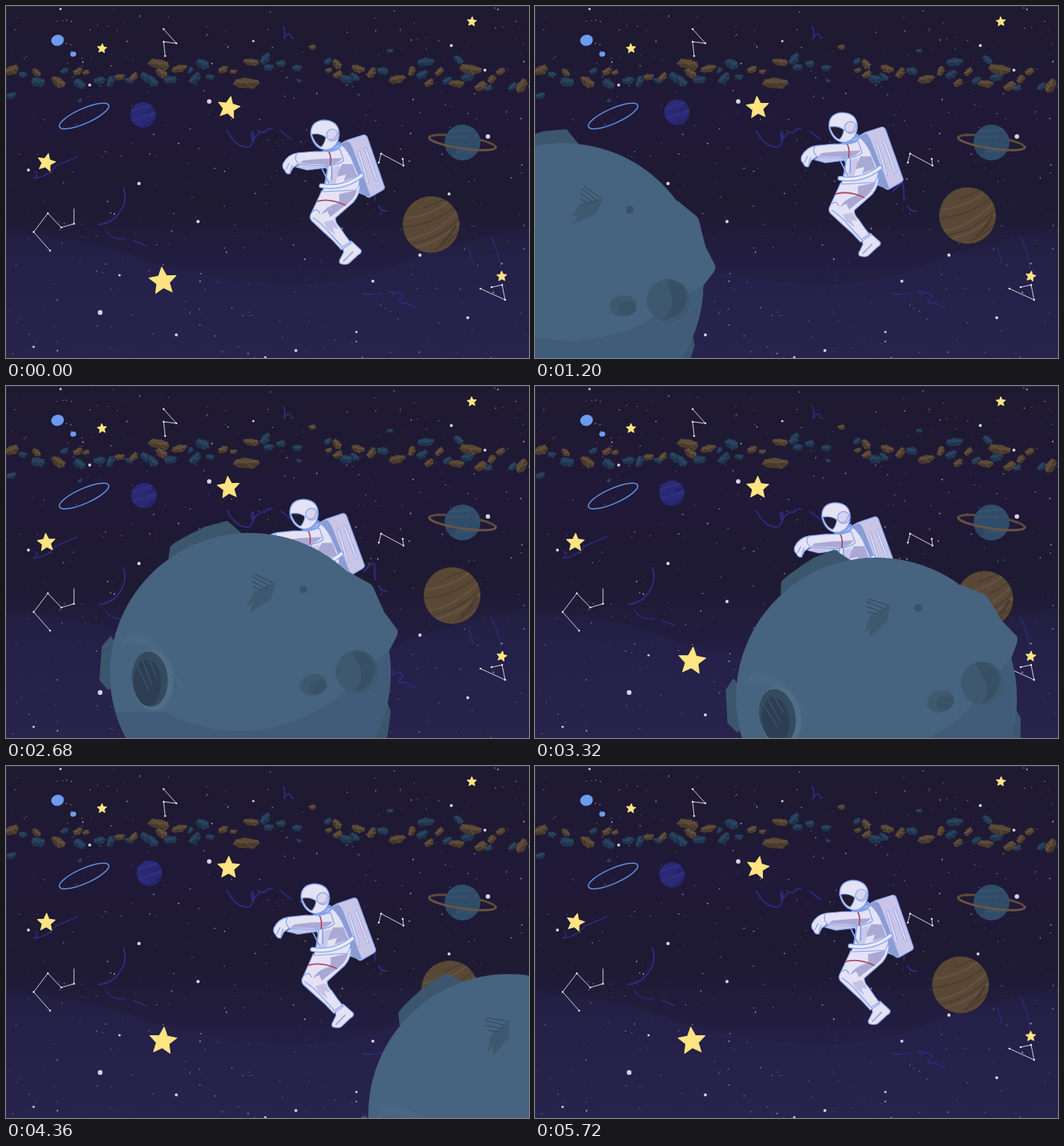
Animation of 700x472 px, one loop 5760 ms. Source, as an HTML page with a canvas:

```html
<!DOCTYPE html>
<html>
<head>
<meta charset="utf-8">
<title>Spacewalk</title>
<style>
html, body { margin: 0; width: 100%; height: 100%; overflow: hidden; background: #1f1b33; }
canvas { display: block; }
</style>
</head>
<body>
<canvas id="stage" width="700" height="472"></canvas>
<script>
const W = 700, H = 472, LOOP = 5760, STEP = 40;
const stage = document.getElementById('stage');
const sky = document.createElement('canvas');
sky.width = W;
sky.height = H;
let g = sky.getContext('2d');

let seed = 11;
const rnd = () => (seed = seed * 16807 % 2147483647) / 2147483647;

// Drawing helpers
function fill(d, color) {
  g.fillStyle = color;
  g.fill(new Path2D(d));
}
function line(d, color, width = 1) {
  g.strokeStyle = color;
  g.lineWidth = width;
  g.stroke(new Path2D(d));
}
function shape(d, color, edge, width) {
  fill(d, color);
  line(d, edge, width);
}
function oval(x, y, rx, ry, color, turn = 0) {
  g.fillStyle = color;
  g.beginPath();
  g.ellipse(x, y, rx, ry, turn, 0, 7);
  g.fill();
}
const disc = (x, y, r, color) => oval(x, y, r, r, color);
function placed(x, y, degrees, draw) {
  g.save();
  g.translate(x, y);
  g.rotate(degrees * Math.PI / 180);
  draw();
  g.restore();
}
function clipDisc(r, draw) {
  g.save();
  g.beginPath();
  g.arc(0, 0, r, 0, 7);
  g.clip();
  draw();
  g.restore();
}

// Smooth track through keys of [time, ...values]
function track(keys, t) {
  let i = 1;
  while (t >= keys[i + 1][0]) i++;
  const [a, b, c, d] = keys.slice(i - 1, i + 3);
  const span = c[0] - b[0], u = (t - b[0]) / span, v = 1 - u;
  return b.slice(1).map((p, j) => {
    const n = j + 1;
    const m0 = (c[n] - a[n]) / (c[0] - a[0]) * span;
    const m1 = (d[n] - b[n]) / (d[0] - b[0]) * span;
    return v * v * (1 + 2 * u) * p + u * v * v * m0 + u * u * (3 - 2 * u) * c[n] - u * u * v * m1;
  });
}
function cyclic(keys) {
  const shift = (k, by) => [k[0] + by, ...k.slice(1)];
  return [shift(keys[keys.length - 1], -LOOP), ...keys, shift(keys[0], LOOP), shift(keys[1], LOOP)];
}

const floatPath = cyclic([[0, 0, 0, 0], [600, -7, -8, -1], [1840, -22, -9.5, 0],
  [2680, -28, -1, -1], [3320, -24, 3.5, -1], [4360, -13, 5, -1]]);
const brownPath = cyclic([[0, 569, 293], [600, 572, 285.5], [1840, 587, 278],
  [2680, 597, 281], [3320, 602, 286], [4360, 594, 299]]);
const moonPath = [[-600, -323, 410, -16], [0, -203, 402, -12], [600, -83, 389, -8],
  [1840, 165, 360, 0], [2680, 327, 385, -12.8], [3320, 457, 418, -20],
  [4360, 673, 467, -28], [5760, 960, 535, -36], [6400, 1090, 565, -40]];

// x, y, width
const brownRocks = [8,86,20, 41,89,13, 70,102,20, 96,88,14, 107,89,10, 152,95,14, 171,95,14,
  205,78,30, 232,84,22, 208,90,18, 291,85,14, 304,88,10, 322,103,34, 328,75,22, 410,55,10,
  432,86,10, 443,78,16, 444,92,14, 471,84,18, 489,90,16, 523,98,24, 543,87,14, 566,103,14,
  580,88,14, 603,104,22, 622,85,30, 636,107,18, 662,88,14, 650,98,14, 690,107,20];
const blueRocks = [22,92,12, 43,102,20, 7,120,14, 78,87,12, 98,104,18, 99,127,7, 125,100,16,
  140,101,16, 165,100,12, 187,96,18, 196,101,18, 220,99,18, 247,86,10, 253,97,18, 263,78,20,
  273,95,12, 347,71,18, 352,82,14, 368,77,14, 390,83,14, 392,100,7, 431,74,12, 456,98,18,
  467,95,14, 504,87,16, 514,60,9, 557,92,16, 561,75,24, 591,100,14, 605,72,15, 618,95,18,
  646,110,12, 678,108,14];
const brightDots = [272,128,3, 645,175,3, 126,411,3.2, 178,238,2.3, 257,289,2.2, 228,441,2.1,
  554,334,2.2, 593,252,2, 491,369,2.1, 112,106,2, 596,53,2, 30,220,2, 641,86,2, 618,418,2,
  388,462,2, 73,4,1.6, 331,47,1.6, 152,361,1.6, 37,457,1.6, 469,437,1.6, 347,471,1.6];
function triples(list, draw) {
  for (let i = 0; i < list.length; i += 3) draw(list[i], list[i + 1], list[i + 2]);
}

function rocks(list, base, light, dark) {
  triples(list, (x, y, w) => {
    const tilt = w > 20 ? rnd() * 24 - 12 : rnd() * 110 - 65;
    placed(x, y, tilt, () => {
      const pts = [];
      for (let i = 0; i < 7; i++) {
        const a = (i + rnd() * .5) * Math.PI * 2 / 7, r = w * (.48 + rnd() * .1);
        pts.push([Math.cos(a) * r, Math.sin(a) * r * (w > 20 ? .45 : .64)]);
      }
      shape('M' + pts.join('L') + 'Z', base, '#211d30', .6);
      fill('M' + [...pts.slice(0, 4), [0, 0]].join('L') + 'Z', dark);
      line(`M${pts[4]}L0 0L${pts[6]}M0 0L${pts[1]}`, light, .7);
    });
  });
}

function paintSky() {
  const shade = g.createLinearGradient(0, 0, 0, H);
  shade.addColorStop(0, '#1e1a2f');
  shade.addColorStop(.3, '#201938');
  shade.addColorStop(.55, '#1e1a32');
  shade.addColorStop(.75, '#231e42');
  shade.addColorStop(1, '#27234b');
  g.fillStyle = shade;
  g.fillRect(0, 0, W, H);
  fill('M0 305Q90 305 170 335T350 372T520 348T700 298V472H0Z', 'rgba(42,38,86,.32)');
  line('M.5 472V.5H700', '#2c2752');
  for (let i = 0; i < 390; i++) {
    g.globalAlpha = .3 + rnd() * .55;
    disc(rnd() * W, rnd() * H, .45 + rnd() * rnd() * .8, '#dcd9ee');
  }
  g.globalAlpha = 1;
  triples(brightDots, (x, y, r) => disc(x, y, r, '#d5d1e6'));

  g.lineCap = g.lineJoin = 'round';
  const ink = '#2e2b7c';
  line('M371 27Q375 34 372 44Q378 34 381 39Q381 44 385 43M368 168L382 179', ink, 1.8);
  line('M296 167Q308 191 326 189Q334 181 331 169Q327 167 330 180Q342 165 346 170Q349 164 356 165', ink, 2);
  line('M38 222Q46 224 37 231Q56 229 66 215L96 202M170 314L187 321M133 300Q140 314 160 312', ink, 1.5);
  line('M157 244Q165 265 145 285Q135 292 125 293', ink, 2.2);
  line('M479 386Q490 388 502 385M512 384Q525 381 517 388Q530 379 531 391Q519 398 535 398L548 404', ink, 1.8);
  line('M649 309Q660 330 662 352M619 324L625 345', ink, 1.3);
  line('M479 249Q492 234 493 239L494 260M499 268Q502 276 510 275', ink, 2.2);

  const stars = 'M211 31L228 50L211 48L213 67M59 328L37 303L56 278L74 297L91 292V272' +
    'M499 210L502 198L532 214L531 205M635 379L668 394L664 374L650 377';
  line(stars, '#d8d5e8', 1);
  for (const p of stars.match(/[ML]\d+ \d+/g)) {
    const [x, y] = p.slice(1).split(' ');
    disc(+x, +y, 1.3, '#eeecf6');
  }

  rocks(blueRocks, '#263f5b', '#34516f', '#1f334c');
  rocks(brownRocks, '#594836', '#715d47', '#49392d');

  oval(69, 46, 8.5, 7.5, '#6b9cf0', -.2);
  oval(90, 64.5, 4, 3.4, '#6b9cf0', -.2);
  placed(104.5, 147.5, -24, () => {
    g.strokeStyle = '#6293e6';
    g.lineWidth = 1.6;
    g.beginPath();
    g.ellipse(0, 0, 36, 10, 0, 0, 7);
    g.stroke();
  });

  placed(611, 183, 8.5, () => {
    const ring = 'A45 8 0 0 ';
    line(`M-45 0${ring}1 45 0`, '#604b3b', 3);
    disc(0, 0, 24, '#2f4d69');
    clipDisc(24, () => {
      line('M-18 -12L14 -20M-22 -4L20 -11M-16 15L18 9', '#35536f', 3);
      disc(11, -10, 4, '#3c4765');
      disc(-13, 13, 6, '#2b4761');
    });
    line(`M-45 0${ring}0 45 0`, '#6b5443', 3);
  });
}

function star(x, y, r, tilt) {
  placed(x, y, tilt, () => {
    const pts = [];
    for (let i = 0; i < 10; i++) {
      const a = i * Math.PI / 5 - Math.PI / 2, q = i % 2 ? r * .47 : r;
      pts.push([Math.cos(a) * q, Math.sin(a) * q]);
    }
    shape('M' + pts.join('L') + 'Z', '#ffe482', '#ffe482', 1);
  });
}

function brownPlanet() {
  disc(0, 0, 38, '#594836');
  clipDisc(38, () => {
    line('M-34 -8Q0 -12 25 -32M-30 20Q6 14 36 -18M-20 31Q14 22 38 -2', '#645240', 2.5);
    line('M-38 4Q4 0 34 -25M-8 -23L16 -33M-27 26Q10 20 38 -9M4 34Q25 25 38 8', '#4b3b30', 1.6);
    line('M20 20L33 2M12 27L27 14', '#4b3b30', 3);
  });
}

function purplePlanet() {
  disc(0, 0, 17, '#292976');
  clipDisc(17, () => {
    line('M-16 -5L10 -13M-15 8L16 -2', '#30307f', 3);
    line('M2 15L16 6M5 -3L16 -8', '#242464', 3);
  });
}

function moon() {
  const dark = '#3b566d', mid = '#3e596f';
  fill('M-73 -174L-67 -189Q-63 -194 -15 -205L15 -206L33 -182L0 -150Z', dark);
  fill('M-171 -90L-186 -79L-199 -36L-191 -20L-150 -30Z', dark);
  fill('M170 76L172 92L160 124L134 142L120 120Z', dark);
  fill('M158 -104Q166 -96 180 -84Q186 -80 187 -70L193 -40L205 -13Q205 -7 198 0L186 14L150 0Z', '#466380');
  disc(0, 0, 188, '#466380');
  clipDisc(188, () => {
    fill('M-190 10L-122 26Q-72 72 10 78Q90 74 122 48L190 10V190H-190Z', 'rgba(60,86,116,.5)');
    fill('M-160 -78Q-118 -72 -108 -34L-92 2L-102 -42Q-116 -82 -145 -88Z', 'rgba(82,111,139,.35)');
  });
  oval(-130, -20, 28, 41, '#506d87', .15);
  oval(-133, -22, 24, 37, '#344a5e', .15);
  oval(-137, -18, 18, 31, '#2d4053', .2);
  line('M-146 -48L-138 -8M-137 -48L-132 -15M-128 -48L-124 -25', '#3b5268', 1.6);
  disc(140, 30, 29, mid);
  fill('M140 2Q164 4 165 30Q157 54 130 56Q150 40 143 20Z', '#385065');
  oval(79, 34, 18.5, 14.5, mid);
  oval(84, 38, 12, 9, '#395268');
  disc(94, -94, 5.2, '#385268');
  fill('M28 -105L60 -112L49 -91L18 -79L24 -91L15 -88Z', mid);
  line('M31 -126L50 -109M35 -128L56 -112M30 -119L47 -105M29 -112L39 -105', '#354c60', 1.3);
}

function astronaut() {
  const suit = '#e5e2f5', blue = '#83a3ee', tone = '#aaa9d5', red = '#a94b63';
  // Backpack
  shape('M447 185L456 180L478 173Q482 172 484 177L506 241Q508 244 504 247L488 256Q485 258 481 254L464 247Z', '#c9c5e8', blue, 1.2);
  fill('M448 185L457 181Q461 183 464 191L488 255Q483 257 474 250Z', '#8b9bd3');
  line('M472 195Q478 215 484 237M481 191Q488 210 496 233', '#9babe1', 4);
  line('M472 195Q478 215 484 237M481 191Q488 210 496 233', '#e0def5', 2);
  // Boots and legs
  shape('M450 320L462 315L475 327Q477 331 471 334L459 345Q454 348 447 345Q445 342 448 338L452 330Z', suit, blue, 1.2);
  line('M452 342L464 330', tone, 2);
  shape('M423 247L474 240Q474 252 465 263L441 284Q440 290 447 297Q454 308 462 318L449 327Q438 314 425 303L409 288Q405 283 409 277Z', suit, blue, 1.2);
  fill('M446 252L470 247Q466 261 448 272L434 283L430 275L422 280Q428 268 446 264Z', tone);
  fill('M425 290L438 287L445 299L437 297L441 307L430 299Z', '#c4c1e4');
  line('M416 262Q433 257 454 267', red, 1.8);
  line('M411 284Q424 293 431 302L449 322M411 275Q417 270 420 278M449 324L461 316', blue, 1.2);
  // Torso
  shape('M421 196L448 185Q460 196 465 211L473 230Q474 241 468 247L424 249L430 222Z', suit, blue, 1);
  fill('M450 212L464 212L470 228L452 235L455 226L440 230Z', tone);
  fill('M438 216L447 214L441 239L431 242Z', '#cbc8e8');
  line('M431 214L427 240M436 214L436 233M423 218L432 237', blue, 1.8);
  line('M422 241Q452 246 476 227', blue, 6.5);
  line('M422 241Q452 246 476 227', '#eae9fa', 4);
  // Arms
  shape('M400 207L427 208L428 217L403 220L388 216Z', '#c8c5e8', blue, 1);
  shape('M447 192Q430 196 414 195L390 197Q377 199 371 211Q369 217 373 220Q375 226 380 225L384 217L391 212L420 214Q444 215 452 207Z', suit, blue, 1.2);
  fill('M398 207L420 205L450 204Q444 213 430 213L393 211Z', tone);
  line('M389 198Q385 205 391 211M375 219L379 211M380 223L383 213', blue, 1.2);
  line('M432 195Q436 202 434 213', red, 1.8);
  // Helmet
  line('M423 191Q436 196 446 183M427 194Q440 196 448 187', blue, 3);
  shape('M408 173Q407 154 426 153Q446 154 446 173Q444 191 428 193Q413 192 408 173Z', suit, blue, 1.3);
  shape('M409 172Q420 170 428 176Q427 184 422 189Q414 187 409 172Z', '#201c32', blue, 1.2);
  g.beginPath();
  g.arc(437, 173, 8, 0, 7);
  g.fillStyle = '#d8d4ee';
  g.strokeStyle = blue;
  g.fill();
  g.stroke();
  line('M433 179Q441 181 443 171', tone, 1.5);
}

const view = stage.getContext('2d');
view.lineCap = view.lineJoin = 'round';

function frame(now) {
  const t = Math.floor(now % LOOP / STEP) * STEP;
  const wave = (period, delay) => Math.cos((t - delay) / period * Math.PI * 2);
  g.drawImage(sky, 0, 0);

  const rock = wave(1920, 0);
  star(128.5, 57, 6.5, 6 * rock);
  star(54, 210, 12.5, 3 + 10 * rock);
  star(298, 136.5, 15.5, 2 + 9 * rock);
  star(210, 369, 19, 4 - 9 * rock);
  star(623.5, 21, 6.5, 5 * rock);
  star(663.5, 362.5, 7, 5 - 6 * rock);

  placed(187.5 - 4.7 * wave(2880, 220), 144.7 - 2.5 * wave(2880, 950), 0, purplePlanet);
  placed(...track(brownPath, t), 0, brownPlanet);

  const [x, y, tilt] = track(floatPath, t);
  placed(x + 426, y + 173, tilt, () => {
    g.translate(-426, -173);
    astronaut();
  });
  placed(...track(moonPath, t), moon);
  requestAnimationFrame(frame);
}

paintSky();
g = view;
requestAnimationFrame(frame);
</script>
</body>
</html>
```
